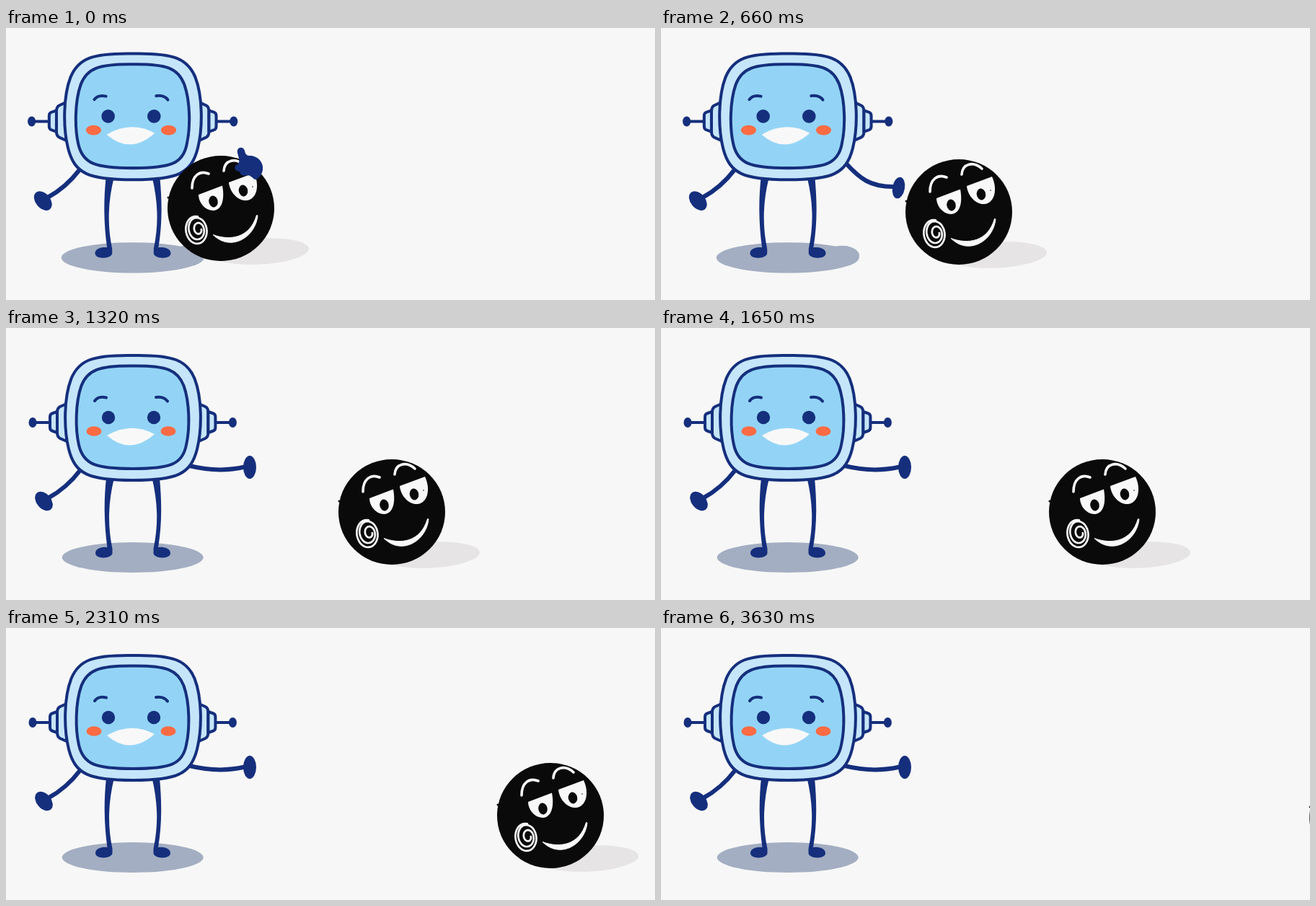
Write an HTML page that moves like this. It is 900 px wide and 377 px high and loops after 3.96 s.

```html
<!DOCTYPE html>
<html lang="en">
<head>
<meta charset="utf-8">
<title>Robot and ball</title>
<style>
  html, body { margin: 0; width: 100%; height: 100%; overflow: hidden; background: #f7f7f7; }
  svg { display: block; width: 100%; height: 100%; }
  .navy { fill: #152f7d; }
  .line { fill: none; stroke: #152f7d; stroke-width: 4; stroke-linecap: round; }
  .limb { stroke-width: 6; }
  .shell { fill: #c5e5fa; stroke: #152f7d; stroke-width: 4; stroke-linejoin: round; }
  .screen { fill: #93d4f6; }
  .chalk { fill: none; stroke: #f8f8f8; stroke-width: 3.6; stroke-linecap: round; }
  .white { fill: #f8f8f8; }
  .ink { fill: #0b0a0a; }
</style>
</head>
<body>
<svg viewBox="0 0 900 377" preserveAspectRatio="none">
  <defs>
    <g id="ear">
      <path class="line" d="M40 131H62"/>
      <ellipse class="navy" cx="37" cy="131" rx="5.5" ry="7"/>
      <path class="shell" d="M84 105L75 109Q71 111 71 117V145Q71 151 75 153L84 157Z"/>
      <path class="shell" d="M71 116L65 118Q61 119 61 123V138Q61 142 65 143L71 145Z"/>
    </g>
  </defs>

  <path id="arm" class="line limb"/>
  <ellipse id="palm" class="navy"/>

  <g id="robot">
    <ellipse cx="175.7" cy="318" rx="98" ry="21" fill="#a3aec2"/>
    <ellipse id="bump" cx="250" cy="315" rx="24" ry="13.5" fill="#a3aec2"/>
    <path class="line limb" d="M103 197Q84 222 58 236"/>
    <ellipse class="navy" rx="15" ry="10" transform="translate(52.5 240) rotate(50)"/>
    <path class="navy" d="M139 208H150C142 240 140.500 272 147.500 306V312C147 320 124 321 124 312C124 305 134 303 140.500 304C136 272 135.500 240 139 208Z"/>
    <path class="navy" d="M213 208H202.500C210 240 212 270 204.500 306V312C205 320 228 321 228 312C228 305 218 303 211 304C216.500 272 216 240 213 208Z"/>
    <use href="#ear"/>
    <use href="#ear" transform="matrix(-1 0 0 1 351.400 0)"/>
    <path class="shell" d="M176 38C119 37 101 45 90.500 70C80 97 80 140 87 168C96 203 115 211 176 211C237 211 256 203 265 168C272 140 272 97 261.500 70C251 45 233 37 176 38Z"/>
    <path class="shell screen" d="M176 52.500C129 52 113 58 104.500 80C96 104 96 140 101 162C107 189 124 195 176 195C228 195 245 189 250 162C255 140 255 104 246.500 80C238 58 223 52 176 52.500Z"/>
    <path class="line" d="M123 101Q128 94 139 96.500M208 96Q219 94.500 224 101.500"/>
    <circle class="navy" cx="142" cy="124" r="9.200"/>
    <circle class="navy" cx="205" cy="124" r="9.200"/>
    <ellipse cx="122" cy="143" rx="10.500" ry="6.800" fill="#fc6b43"/>
    <ellipse cx="225" cy="143" rx="10.500" ry="6.800" fill="#fc6b43"/>
    <path class="white" d="M140 149Q173 129.500 206 147Q172 177 140 149Z"/>
  </g>

  <g id="ball">
    <ellipse cx="54" cy="59.500" rx="68" ry="18" fill="#e6e4e5" transform="rotate(-3 54 59.500)"/>
    <ellipse class="ink" rx="74" ry="73"/>
    <circle class="ink" cx="-73" cy="-15" r="1.500"/>
    <path class="chalk" d="M-40 -28C-40 -46 -29 -53 -17 -48M4 -52C5 -67 20 -71 32 -60"/>
    <path class="white" d="M-31 -19L2 -31.500C6 -10 0 2 -10 3C-23 3 -31 -9 -31 -19Z"/>
    <path class="white" d="M11 -36L46 -49C54 -32 50 -13 36 -11C22 -10 12 -24 11 -36Z"/>
    <ellipse class="ink" rx="6.200" ry="8" transform="translate(-10.500 -9.500) rotate(-10)"/>
    <ellipse class="ink" rx="6.200" ry="8" transform="translate(31 -24.500) rotate(-10)"/>
    <circle class="ink" cx="44" cy="-30" r=".8"/>
    <path class="white" stroke="#f8f8f8" stroke-linejoin="round" d="M-11 36.500C12 45 40 42 49.500 9.500L51 10C48 40 14 61 -11 36.500Z"/>
    <path id="swirl" class="chalk" style="stroke-width:2.700" transform="translate(-34 30) rotate(-8)"/>
  </g>

  <path id="hand" class="navy" d="M321 173C319 165 329 163 331 170Q332 177 337 177C348 176 358 186 356 197C354 206 349 210 345 210C341 207 339 204 334 204C329 206 325 204 324 199C318 199 315 193 319 190C323 189 324 185 323 181Z"/>
</svg>

<script>
const STEP = 330;
const ballX = [298, 362, 413, 465, 535, 612, 662, 755, 798, 854, 903, 973.3];
const ballY = [250, 254, 255, 253, 255, 255, 254, 260, 257, 252, 258, 263];
const LOOP = STEP * ballX.length;

const rest = { arm: "M256 187C276 209 290 220 322 220", palm: [329.5, 221.5, 8.5, 15, 10] };
const touch = { arm: "M256 187Q290 211 325 194", palm: null };
const raised = { arm: "M254 191Q295 201 331 192.500", palm: [338, 193, 9, 16, 0] };

const $ = id => document.getElementById(id);
const set = (id, attrs) => {
  for (const key in attrs) $(id).setAttribute(key, attrs[key]);
};
const show = (id, on) => set(id, { visibility: on ? "visible" : "hidden" });

// Spiral whose centre drifts to the right as it tightens
function swirlPath() {
  const points = [];
  const turns = 2.8;
  for (let i = 0; i <= 90; i++) {
    const k = i / 90;
    const size = Math.min(1, 0.2 + k * 1.1);
    const a = k * turns * 2 * Math.PI;
    const x = 5 * (1 - size) + 14.5 * size * Math.cos(a);
    const y = 19 * size * Math.sin(a);
    points.push(x.toFixed(1) + " " + y.toFixed(1));
  }
  return "M" + points.join("L");
}

function draw(time) {
  const n = Math.floor((time % LOOP) / STEP);
  const early = n < 3;
  const pose = n === 1 ? touch : early ? rest : raised;

  set("ball", { transform: `translate(${ballX[n]} ${ballY[n]})` });
  set("robot", { transform: early ? "translate(176 234) scale(1.01) translate(-176 -234.500)" : "" });
  set("arm", { d: pose.arm });
  show("palm", pose.palm);
  if (pose.palm) {
    const [x, y, rx, ry, turn] = pose.palm;
    set("palm", { rx, ry, transform: `translate(${x} ${y}) rotate(${turn})` });
  }
  show("hand", n < 2);
  show("bump", early);
}

set("swirl", { d: swirlPath() });
const start = performance.now();
function tick() {
  draw(performance.now() - start);
  requestAnimationFrame(tick);
}
tick();
</script>
</body>
</html>
```
